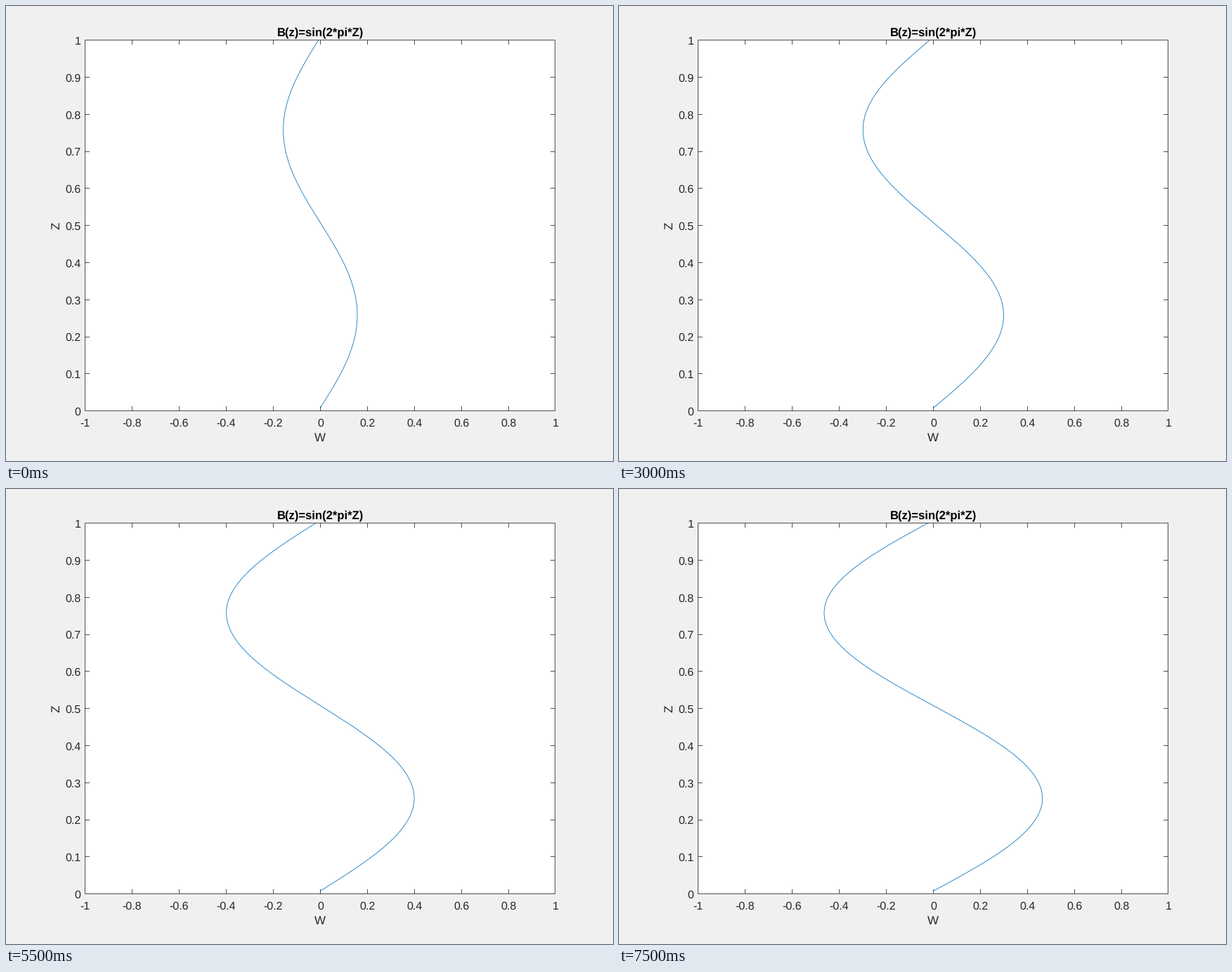
Write a matplotlib script that moves like this. It is 864x648 px and loops after 8000 ms.

```python
import numpy as np
import matplotlib.pyplot as plt
from matplotlib.animation import FuncAnimation
from matplotlib.patches import Rectangle

W, H, DPI = 864, 648, 72
FRAMES, INTERVAL = 16, 500
LEFT, RIGHT, TOP, BOTTOM = 112.5, 781.5, 48.5, 576.5
INK, BLUE = "#262626", "#0072BD"
LINE = 0.8
Z0 = 1 / 128  # the curve starts just above the floor

plt.rcParams["font.family"] = "Liberation Sans"
plt.rcParams["text.hinting"] = "no_hinting"
fig = plt.figure(figsize=(W / DPI, H / DPI), dpi=DPI, facecolor="#F0F0F0")
ax = fig.add_axes([0, 0, 1, 1])
ax.set_xlim(0, W)
ax.set_ylim(H, 0)
ax.axis("off")


def px(w):
    return 112.55 + (w + 1) / 2 * 669.6


def py(z):
    return 576.7 - z * 528.1


def tick(x, y, dx, dy):
    ax.plot([x, x + dx], [y, y + dy], color=INK, lw=LINE, snap=False, solid_capstyle="butt")


def label(x, y, text, size=16, color=INK, ha="center", **kw):
    ax.text(x, y, text, fontsize=size, color=color, ha=ha, va="baseline", **kw)


def box(**kw):
    ax.add_patch(Rectangle((LEFT, TOP), RIGHT - LEFT, BOTTOM - TOP, snap=False, **kw))


box(fc="white", ec="none")

for i in range(11):
    w, z = (i - 5) / 5, i / 10
    x, y = np.floor(px(w)) + 0.5, np.floor(py(z)) + 0.5
    if 0 < i < 10:
        tick(x, BOTTOM, 0, -6.5)
        tick(x, TOP, 0, 6.5)
        tick(LEFT, y, 6.5, 0)
        tick(RIGHT, y, -6.5, 0)
    label(px(w), 599, f"{w:g}")
    label(106.4, py(z) + 6.2, f"{z:g}", ha="right")

box(fc="none", ec=INK, lw=LINE, zorder=3)

label(447.3, 42.2, "B(z)=sin(2*pi*Z)", size=16.6, color="black", weight="bold")
label(447.3, 620.2, "W", size=17)
label(76.6, 312.6, "Z", size=17, rotation=90, rotation_mode="anchor")

z = np.linspace(Z0, 1, 240)
shape = np.sin(2 * np.pi * (z - Z0))
curve, = ax.plot([], [], color=BLUE, lw=LINE, zorder=4, snap=False, solid_capstyle="butt")


def draw(n):
    amp = 0.554 * np.sin(0.288 + 0.047 * n)
    curve.set_data(px(amp * shape), py(z))
    return curve,


anim = FuncAnimation(fig, draw, frames=FRAMES, interval=INTERVAL, repeat=True, repeat_delay=0)
plt.show()
```
